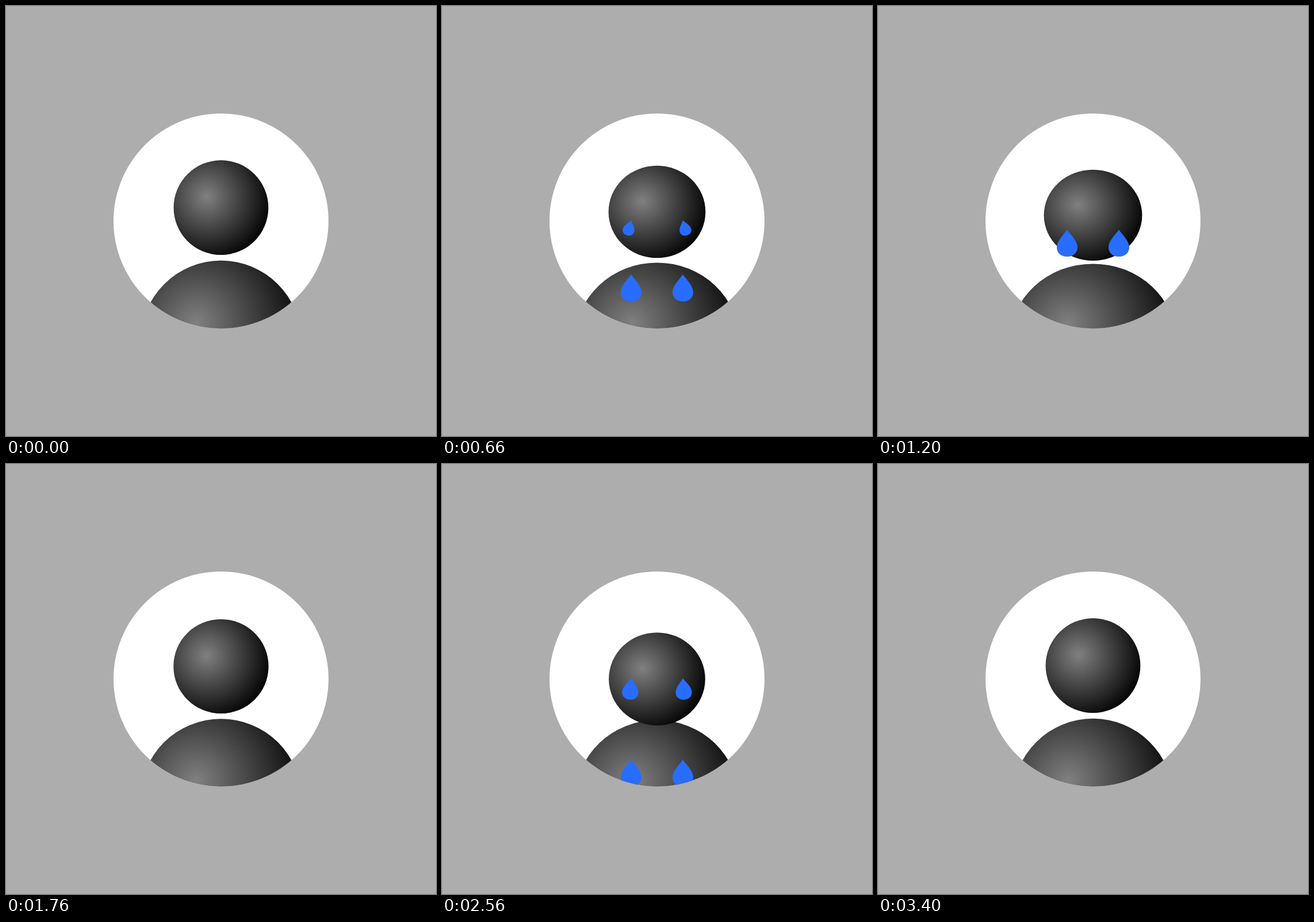
These frames come from a looping animation (748x748 px, 3.43 s). An HTML page with a canvas:

```html
<!DOCTYPE html>
<html lang="en">
<head>
<meta charset="utf-8">
<title>Crying avatar</title>
<style>
  html, body { margin: 0; width: 100%; height: 100%; overflow: hidden; background: #adadad; }
  canvas { display: block; width: 748px; height: 748px; }
</style>
</head>
<body>
<canvas id="stage" width="748" height="748"></canvas>
<script>
const ctx = document.getElementById('stage').getContext('2d');
const LOOP = 3430, SOB = 51, CENTER = 374;

// Times below are in ticks of 1/30 s.
const DROPS = [11.15, 23, 32.35, 66.15, 78.5, 87.7];
const GROW = 7, GRAVITY = 2.4, EYE_Y = 373, EYE_DX = 45;
const SQUASH = [[0, 0], [10, 1], [17, 0.3], [23, 1], [28, 0.2], [36, 1], [51, 0]];
const SINK = [[0, 0], [10, 13.3], [17, 3.7], [28, 25]];

function easedKeys(keys, t) {
  for (let i = 1; i < keys.length; i++) {
    const [t0, v0] = keys[i - 1], [t1, v1] = keys[i];
    if (t <= t1) return v0 + (v1 - v0) * (1 - Math.cos(Math.PI * (t - t0) / (t1 - t0))) / 2;
  }
  return keys[keys.length - 1][1];
}

function headSink(t) {
  return t <= 28 ? easedKeys(SINK, t) : 25 * ((SOB - t) / (SOB - 28)) ** 1.5;
}

function disc(x, y, r, fill) {
  ctx.beginPath();
  ctx.arc(x, y, r, 0, 2 * Math.PI);
  ctx.fillStyle = fill;
  ctx.fill();
}

const shade = ctx.createRadialGradient(-0.305, -0.23, 0, -0.305, -0.23, 1.42);
shade.addColorStop(0, '#808080');
shade.addColorStop(1, '#000');

function ball(y, r, squash) {
  ctx.save();
  ctx.translate(CENTER, y);
  ctx.scale(r * (1 + 0.037 * squash), r * (1 - 0.04 * squash));
  disc(0, 0, 1, shade);
  ctx.restore();
}

function tear(side, y, size) {
  ctx.save();
  ctx.translate(CENTER + side * EYE_DX, y);
  ctx.rotate(-side * 1.4 * (1 - size) ** 2);
  ctx.scale(size, size);
  ctx.beginPath();
  ctx.moveTo(0, 0);
  ctx.bezierCurveTo(5, 8, 18, 19, 18, 31);
  ctx.bezierCurveTo(18, 41, 10, 47, 0, 47);
  ctx.bezierCurveTo(-10, 47, -18, 41, -18, 31);
  ctx.bezierCurveTo(-18, 19, -5, 8, 0, 0);
  ctx.fillStyle = '#296dff';
  ctx.fill();
  ctx.restore();
}

function draw(tick) {
  const t = tick % SOB;
  const squash = easedKeys(SQUASH, t);

  ctx.fillStyle = '#adadad';
  ctx.fillRect(0, 0, 748, 748);
  disc(CENTER, CENTER, 187, '#fff');

  ctx.save();
  ctx.beginPath();
  ctx.arc(CENTER, CENTER, 187, 0, 2 * Math.PI);
  ctx.clip();
  ball(582.4, 139.6, squash);
  ball(350.7 + headSink(t), 82.4, squash);
  for (const release of DROPS) {
    const age = tick - release;
    if (age <= -GROW || age > 13) continue;
    const size = Math.min(1, 1 + age / GROW);
    const y = EYE_Y + GRAVITY / 2 * Math.max(0, age) ** 2;
    tear(-1, y, size);
    tear(1, y, size);
  }
  ctx.restore();
}

const start = performance.now();
function loop() {
  const ms = (performance.now() - start) % LOOP;
  draw(Math.min(102, Math.floor((ms + 6.7) * 0.03)));
  requestAnimationFrame(loop);
}
loop();
</script>
</body>
</html>
```
